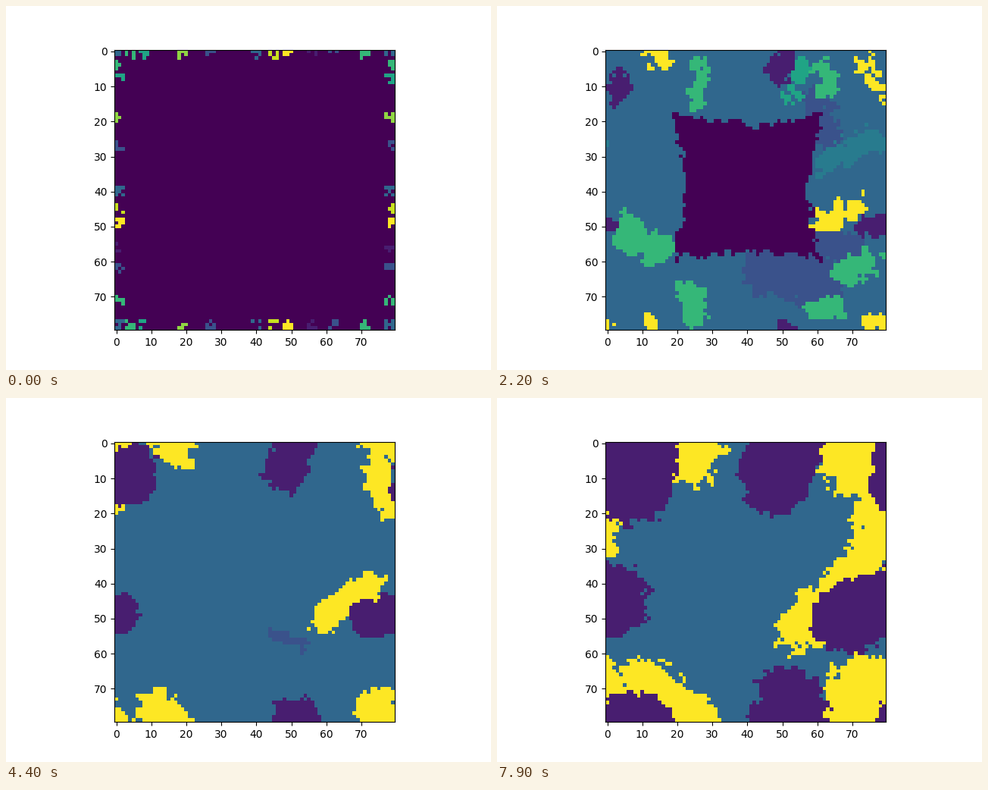
Write a matplotlib script that moves like this. It is 640x480 px and loops after 8 s.

```python
import numpy as np
import matplotlib.pyplot as plt
from matplotlib.animation import FuncAnimation

N, FRAMES, LEVELS = 80, 80, 13
EMPTY, PURPLE, SLATE, BLUE, SEA, TEAL, GREEN, LIME, OLIVE, YELLOW = (
    0, 1, 3, 4, 5, 7, 8, 10, 11, 12)
SETTLED = 28          # from here on only the rivals grow
STEP = 8              # frames between fresh edge noise

yy, xx = np.mgrid[0:N, 0:N].astype(float)
rng = np.random.default_rng(7)

# Seeds: the same colour at the same place along all four sides
SPOTS = [(0, BLUE), (4, GREEN), (8, TEAL), (19, LIME), (27, SLATE), (40, BLUE),
         (45, OLIVE), (49, YELLOW), (56, PURPLE), (62, SLATE), (71, GREEN), (78, BLUE)]

# Early patches at frame 16, as capsules: x0, y0, x1, y1, radius
PATCHES = [
    (SLATE, (47, 65, 62, 68, 8)), (SLATE, (65, 57, 72, 58, 5)), (SLATE, (61, 10, 66, 24, 3.5)),
    (SEA, (65, 31, 80, 24, 3.5)), (TEAL, (57, 1, 54, 9, 3)),
    (GREEN, (3, 53, 12, 59, 5)), (GREEN, (25, 0, 23, 13, 2)), (GREEN, (63, 0, 66, 7, 2.5)),
    (GREEN, (71, 66, 78, 63, 4)), (GREEN, (22, 71, 23, 79, 3.5)), (GREEN, (62, 78, 68, 77, 3)),
]

# Rivals: capsule when settled and at the end, on a torus
RIVALS = [
    (YELLOW, (12, -3, 16, 2, 3), (10, -8, 23, 2, 10)),
    (YELLOW, (-5, -3, 0, -2, 3), (-6, -8, -7, 4, 12)),
    (YELLOW, (-6, 5, -2, 13, 2.5), (-3, 12, -3, 27, 6.5)),
    (YELLOW, (62, 49, 71, 45, 3.5), (55, 53, 74, 33, 6)),
    (PURPLE, (4, 8, 3, 13, 3.5), (8, 3, 7, 11, 12)),
    (PURPLE, (51, 0, 49, 7, 4), (52, -5, 48, 9, 11)),
    (PURPLE, (74, 50, 80, 50, 3.5), (68, 50, 82, 45, 10)),
]


def plant():
    """Scatter seed cells, thinning out away from the border."""
    seeds = {}
    for spot, colour in SPOTS:
        for side in range(4):
            for along in range(max(spot - 1, 0), min(spot + 2, N)):
                for depth in range(3):
                    if rng.random() < .75 - .2 * depth:
                        d = N - 1 - depth if side % 2 else depth
                        seeds[(along, d) if side < 2 else (d, along)] = colour
    return np.array(list(seeds)), np.array(list(seeds.values()))


def capsule(x0, y0, x1, y1, r):
    """Signed distance to a wrapped capsule, positive inside."""
    half = N / 2
    x = (xx - (x0 + x1) / 2 + half) % N - half
    y = (yy - (y0 + y1) / 2 + half) % N - half
    dx, dy = x1 - x0, y1 - y0
    s = np.clip((x * dx + y * dy) / (dx * dx + dy * dy), -.5, .5)
    return r - np.hypot(x - s * dx, y - s * dy)


def ragged(count):
    """Edge noise: fine grain mixed with its 3 x 3 average."""
    grain = rng.normal(size=(FRAMES // STEP + 2, count, N, N))
    soft = sum(np.roll(grain, (i, j), (2, 3)) for i in (-1, 0, 1) for j in (-1, 0, 1)) / 3
    return .7 * grain + .8 * soft


places, colours = plant()
reach = np.hypot(xx[..., None] - places[:, 0], yy[..., None] - places[:, 1])
seed_dist = reach.min(axis=2)
nearest = colours[reach.argmin(axis=2)]
rough = ragged(4)

# Square hole with slightly hollow sides
ax_x, ax_y = abs(xx - 40), abs(yy - 39)
hole_dist = np.maximum(ax_x, ax_y) - .15 * np.minimum(ax_x, ax_y)


def paint_patches(grid, i, noise):
    drift = .2 * np.clip((i - 16) / 12, 0, 2)
    shrink = 2 * drift + .35 * max(0, i - SETTLED)
    for colour, (*ends, r) in PATCHES:
        pulled = [p + (40 - p) * drift for p in ends]
        grid[capsule(*pulled, r - shrink) + noise > 0] = colour


def paint_rivals(grid, i, noises):
    u = max(0, (i - SETTLED) / (FRAMES - 1 - SETTLED))
    for colour, start, end in RIVALS:
        *ends, r = (a + (b - a) * u for a, b in zip(start, end))
        noise = noises[0] if colour == YELLOW else .75 * noises[1]
        grid[capsule(*ends, r * min(1, i / SETTLED)) + noise > 0] = colour


def cells(i):
    k, u = divmod(i, STEP)
    hole, patch, *rival = rough[k] + (rough[k + 1] - rough[k]) * u / STEP
    grid = np.full((N, N), BLUE)
    paint_patches(grid, i, patch)
    paint_rivals(grid, i, rival)
    # Each seed first claims its surroundings, then the patches take over.
    grid = np.where(i < 10 + 2 * rough[0, 1], nearest, grid)
    inner = (hole_dist + .6 * hole < 39.5 - i) & (seed_dist > 0)
    grid[inner | (seed_dist > 1.6 * i)] = EMPTY
    return grid


fig, ax = plt.subplots(figsize=(6.4, 4.8), dpi=100)
image = ax.imshow(cells(0), cmap="viridis", vmin=0, vmax=LEVELS - 1)


def draw(i):
    image.set_data(cells(i))
    return [image]


anim = FuncAnimation(fig, draw, frames=FRAMES, interval=100, repeat=True, repeat_delay=0)
plt.show()
```
